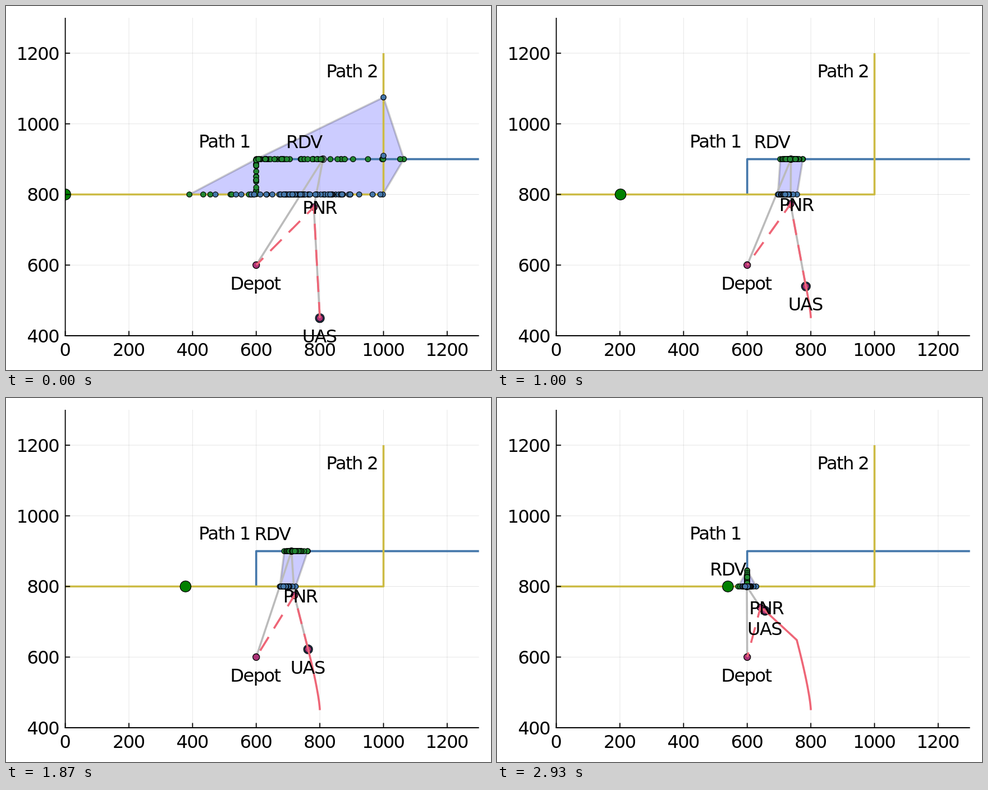
Animation, 864 px wide and 648 px high, one loop 2.99 s. Source, as an HTML page:

```html
<!DOCTYPE html>
<html lang="en">
<head>
<meta charset="utf-8">
<title>Rendezvous planning</title>
<style>
  html, body { margin: 0; width: 100%; height: 100%; overflow: hidden; background: #fff; }
  svg { display: block; width: 864px; height: 648px; }
  text { font: 32px "DejaVu Sans", sans-serif; letter-spacing: -1.55px; text-anchor: middle; }
  .end { text-anchor: end; }
  path, line { fill: none; }
  .thick { stroke-width: 3.6; stroke-linejoin: round; }
  circle { stroke: #000; stroke-width: 1.3; }
</style>
</head>
<body>
<svg viewBox="0 0 864 648">
  <defs><clipPath id="area"><rect x="105.6" y="21" width="737" height="566"/></clipPath></defs>
  <g id="grid"></g>
  <g id="plot" clip-path="url(#area)"></g>
  <g id="axes" stroke="#000" stroke-width="1.8"></g>
  <g id="labels"></g>
</svg>
<script>
const COLOR = { blue: '#4477AA', red: '#EE6677', green: '#228833', yellow: '#CCBB44', purple: '#AA3377', gray: '#BBBBBB' };
const LOOP = 2990, FRAMES = 45, SAMPLES = 85;
const REPLAN = 32; // step at which a nearer rendezvous is chosen
const DEPOT = [600, 600];

const byId = id => document.getElementById(id);
const px = x => 105.6 + x * 0.5669;
const py = y => 587 - (y - 400) * 0.62875;
const toPath = pts => 'M' + pts.map(([x, y]) => px(x).toFixed(2) + ',' + py(y).toFixed(2)).join('L');

function set(el, attrs) {
  for (const name in attrs) el.setAttribute(name, attrs[name]);
  return el;
}
function add(parent, tag, attrs, text) {
  const el = set(document.createElementNS('http://www.w3.org/2000/svg', tag), attrs);
  if (text) el.textContent = text;
  parent.appendChild(el);
  return el;
}
const line = (parent, x1, y1, x2, y2) => add(parent, 'line', { x1, y1, x2, y2 });

// Points on the two roads by arc length
const path1 = s => s < 600 ? [s, 800] : s < 700 ? [600, 200 + s] : [s - 100, 900];
const path2 = s => s < 1000 ? [s, 800] : [1000, s - 200];

// Motion in plot units
const vehicleAt = k => [k * (13.6 - 0.00277 * (k - 22) ** 2), 800];

function uasAt(k) {
  const a = Math.min(k, REPLAN), b = k - a;
  return [800 - 0.384 * a ** 1.37 - 8.3 * b, 450 + 5.8 * a + 0.0125 * a * a + 6.9 * b];
}

// Rendezvous, point of no return and sample limits; the first guess is vague.
function planAt(k) {
  if (k < REPLAN) {
    const vague = Math.exp(-3 * k);
    return {
      rdv: 868 - 2.04 * k + 42 * vague,
      pnr: [755 - 1.25 * k + 26 * vague, 771 + 0.13 * k - 7 * vague],
      spread1: [822 - 1.2 * k - 432 * vague, 890 - k + 274 * vague],
      spread2: [722 - 1.7 * k - 250 * vague, 794 - 2.5 * k + 481 * vague],
    };
  }
  const n = k - REPLAN;
  return {
    rdv: 613 - 1.18 * n,
    pnr: [652.5 - 0.9 * n, 743.5 - 0.25 * n],
    spread1: [615 - 3.6 * n, 627 + 320 * Math.exp(-n / 4.2)],
    spread2: [626 - 3.4 * n, 680 - 4.3 * n],
  };
}

function random(seed) {
  let s = seed * 7919 + 17;
  return () => (s = (s * 48271) % 2147483647) / 2147483647;
}

// Bell-shaped scatter between two limits, always touching both of them.
function scatter(path, [lo, hi], seed, fixed, width) {
  const rnd = random(seed);
  for (let i = 0; i < 5; i++) rnd();
  return Array.from({ length: SAMPLES }, (_, i) => {
    const u = i < fixed.length ? fixed[i] : (rnd() + rnd() + rnd()) / 3 * width;
    return path(lo + (hi - lo) * u);
  });
}

function hull(points) {
  const sorted = [...points].sort((a, b) => a[0] - b[0] || a[1] - b[1]);
  const chain = pts => {
    const out = [];
    for (const p of pts) {
      while (out.length > 1) {
        const [a, b] = out.slice(-2);
        if ((b[0] - a[0]) * (p[1] - a[1]) - (b[1] - a[1]) * (p[0] - a[0]) > 0) break;
        out.pop();
      }
      out.push(p);
    }
    return out.slice(0, -1);
  };
  return chain(sorted).concat(chain(sorted.reverse()));
}

// Axes
const grid = set(byId('grid'), { stroke: '#000', 'stroke-opacity': 0.1 });
const axes = byId('axes'), labels = byId('labels'), plot = byId('plot');
line(axes, 105.6, 21, 105.6, 587.9);
line(axes, 104.7, 587, 842.6, 587);
for (let v = 0; v <= 1200; v += 200) {
  const x = px(v), y = py(v);
  line(axes, x, 587, x, 578.5);
  add(labels, 'text', { x: x - 0.7, y: 622.5 }, String(v));
  if (v) line(grid, x, 21, x, 587);
  if (v < 400) continue;
  line(axes, 105.6, y, 114.1, y);
  add(labels, 'text', { x: 94, y: y + 11.8, class: 'end' }, String(v));
  if (v > 400) line(grid, 105.6, y, 842.6, y);
}

// Plot layers, bottom to top
const stroke = (color, extra) => add(plot, 'path', { class: 'thick', stroke: color, ...extra });
const marker = (r, fill) => add(plot, 'circle', { r, fill });
const dots = fill => Array.from({ length: SAMPLES }, () => marker(4.7, fill));
const place = (el, [x, y]) => set(el, { cx: px(x), cy: py(y) });

const region = stroke('#000', { style: 'fill:#00f;fill-opacity:.2', 'stroke-opacity': 0.2 });
stroke(COLOR.blue, { d: toPath([[600, 800], [600, 900], [1320, 900]]) });
stroke(COLOR.yellow, { d: toPath([[0, 800], [1000, 800], [1000, 1200]]) });
const route = stroke(COLOR.gray);
const vehicle = marker(9.8, '#008000');
const meeting = marker(6, COLOR.gray);
const dots1 = dots(COLOR.green), dots2 = dots(COLOR.blue);
const uasRing = marker(8, COLOR.blue);
place(marker(6, COLOR.purple), DEPOT);
const pnrDot = marker(6, COLOR.purple), uasDot = marker(6, COLOR.purple);
const trail = stroke(COLOR.red);
const plan = stroke(COLOR.red, { 'stroke-dasharray': '28.6 17.9' });

// Labels
const label = (text, x = 0, y = 0) => add(labels, 'text', { x: px(x), y: py(y) + 11.3 }, text);
const moveLabel = (el, [x, y], dx, dy) => set(el, { x: px(x) + dx, y: py(y) + dy + 11.3 });
label('Path 1', 500, 950);
label('Path 2', 901, 1150);
label('Depot', 597, 549);
const rdvLabel = label('RDV'), pnrLabel = label('PNR'), uasLabel = label('UAS');

function draw(step) {
  const { rdv, pnr, spread1, spread2 } = planAt(step);
  const uas = uasAt(step), meet = path1(rdv);
  const set1 = scatter(path1, spread1, step + 3, [0, 1, 0.985, 0.085], 1);
  const set2 = scatter(path2, spread2, step + 101, [0, 1, 0.655, 0.794], 0.7);

  set(region, { d: toPath(hull([...set1, ...set2])) + 'Z' });
  set(route, { d: toPath([uas, pnr, meet, DEPOT]) });
  set(plan, { d: toPath([uas, pnr, DEPOT]) });
  set(trail, { d: toPath(Array.from({ length: step + 1 }, (_, i) => uasAt(i))) });

  set1.forEach((p, i) => place(dots1[i], p));
  set2.forEach((p, i) => place(dots2[i], p));
  place(vehicle, vehicleAt(step));
  place(meeting, meet);
  place(pnrDot, pnr);
  place(uasRing, uas);
  place(uasDot, uas);

  moveLabel(rdvLabel, meet, -34, -31);
  moveLabel(pnrLabel, pnr, 10.3, 1);
  moveLabel(uasLabel, uas, -1, 32);
}

// Steps run at 15 per second, with start times rounded to 10 ms.
const startOf = step => 10 * Math.round(step * 20 / 3);
const origin = performance.now();
let shown = -1;
function tick() {
  const t = (performance.now() - origin) % LOOP;
  let step = FRAMES - 1;
  while (step > 0 && startOf(step) > t) step--;
  if (step !== shown) draw(shown = step);
  requestAnimationFrame(tick);
}
tick();
</script>
</body>
</html>
```
